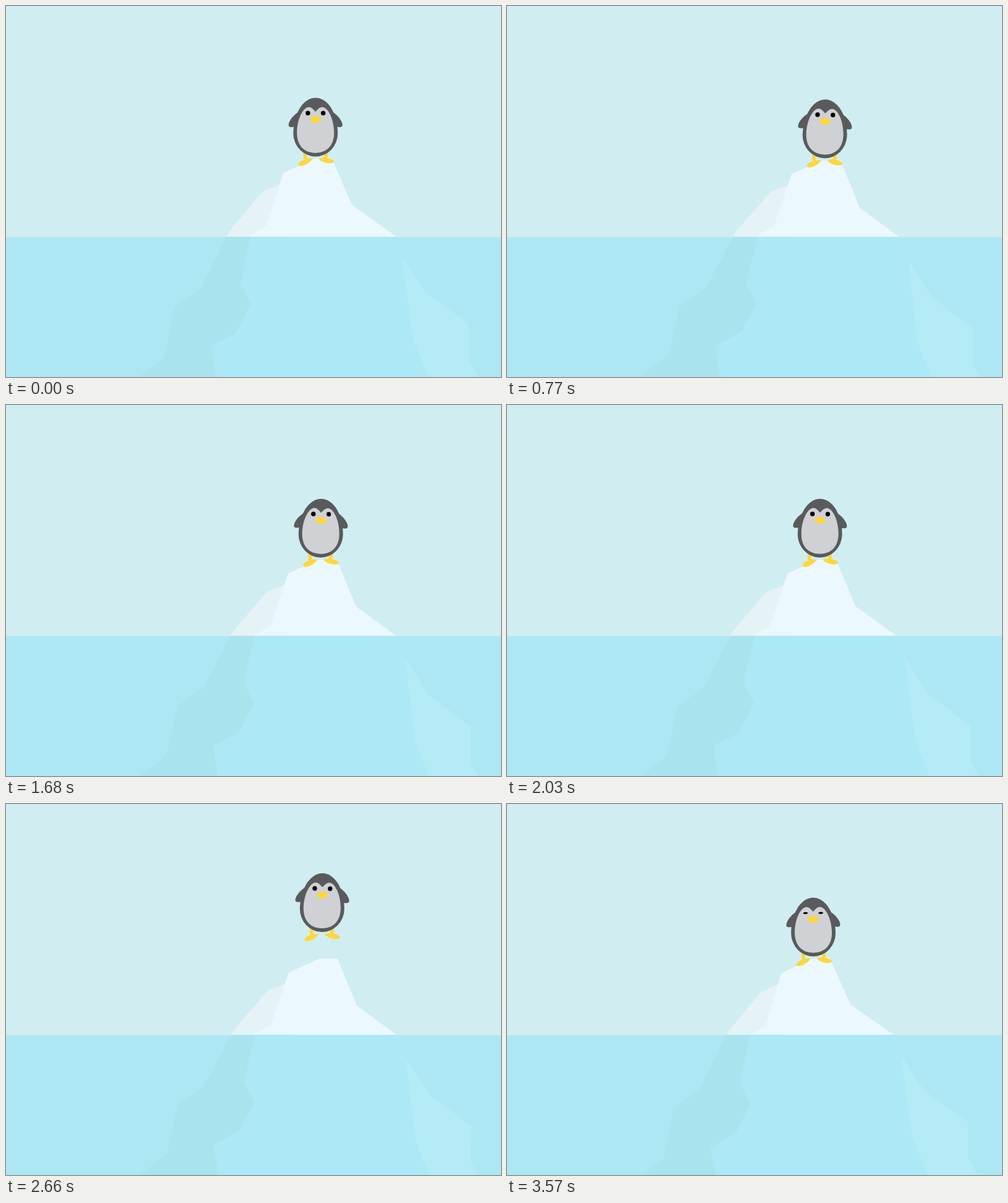
An HTML page with a canvas for the animation above (3640 ms loop, 800 by 600 pixels).

```html
<!DOCTYPE html>
<html lang="en">
<head>
<meta charset="utf-8">
<title>Penguin on an iceberg</title>
<style>
html, body { margin: 0; width: 100%; height: 100%; overflow: hidden; }
canvas { display: block; }
</style>
</head>
<body>
<canvas id="stage" width="800" height="600"></canvas>
<script>
const ctx = document.getElementById('stage').getContext('2d');
const LOOP = 3640, STEP = 70, WATER = 373.5;
const PIVOT = { x: 492, y: 800 }, RADIUS = 605;
const JUMP = { start: 2400, end: 2780, height: 46 };
const BLINK = { middle: 3605, half: 80 };

// Turning points of the swing: [time, px at the penguin's height]
const TURNS = [[-210, -6], [420, 19], [1190, 7], [1600, 9], [2330, 4], [3000, 17], [3570, -5]];

// The front face covers the inner sides of both facets.
const ICE = {
  left: new Path2D('M165 640L256 567 272 487 315 455 360 365 414.5 300 470 277 400 640Z'),
  right: new Path2D('M639.5 404L678 463 747.5 514 747.5 571 784 640 640 640Z'),
  front: new Path2D('M448 270L497 247 526 246 559 322 632.5 374 639.5 404 657 537 699 640' +
    ' 347 640 331 551 372 528 396 481 379 448 396 370 421 355Z')
};
const DARK = '#595a5b', BELLY = '#d0d1d4', YELLOW = '#fed63c';

const ease = u => (1 - Math.cos(Math.PI * Math.min(Math.max(u, 0), 1))) / 2;

function sway(t) {
  const next = Math.max(1, TURNS.findIndex(([time]) => t <= time));
  const [t0, v0] = TURNS[next - 1], [t1, v1] = TURNS[next];
  return v0 + (v1 - v0) * ease((t - t0) / (t1 - t0));
}

function jump(t) {
  const u = (t - JUMP.start) / (JUMP.end - JUMP.start);
  return Math.max(0, 4 * JUMP.height * u * (1 - u));
}

function fill(path, color) {
  ctx.fillStyle = color;
  ctx.fill(path);
}

function mirrored(draw) {
  for (const side of [-1, 1]) {
    ctx.save();
    ctx.scale(side, 1);
    draw(side);
    ctx.restore();
  }
}

function ellipse(x, y, rx, ry, color) {
  const path = new Path2D();
  path.ellipse(x, y, rx, ry, 0, 0, Math.PI * 2);
  fill(path, color);
}

function egg(y, rx, top, bottom, color) {
  const path = new Path2D();
  path.ellipse(0, y, rx, top, 0, Math.PI, 0);
  path.ellipse(0, y, rx, bottom, 0, 0, Math.PI);
  fill(path, color);
}

function layer(y, height, water, front, left, right) {
  ctx.save();
  ctx.beginPath();
  ctx.rect(0, y, 800, height);
  ctx.clip();
  ctx.fillStyle = water;
  ctx.fillRect(0, y, 800, height);
  pose();
  fill(ICE.left, left);
  fill(ICE.right, right);
  fill(ICE.front, front);
  ctx.restore();
}

function foot(side) {
  ctx.translate(5, 247);
  ctx.rotate(side < 0 ? 0.44 : 0.21);
  fill(new Path2D('M0 0C6-5 22-6 25-1C25 5 8 6 0 0Z'), YELLOW);
}

function penguin(t) {
  ctx.save();
  pose();
  ctx.translate(500, -jump(t));
  mirrored(() => fill(new Path2D('M15 238H20L19 248H13Z'), YELLOW));
  mirrored(foot);
  mirrored(() => fill(new Path2D('M26 171C34 174 44 186 43.5 193C43 197 37 196 33 195Z'), DARK));
  egg(205.5, 36, 57, 38, DARK);
  const open = Math.min(1, Math.abs(t - BLINK.middle) / BLINK.half);
  mirrored(() => {
    fill(new Path2D('M-1 171H0C3 168 6 163.5 11 163.5C20 163.5 30 183 30 205' +
      'C30 226 18 237.5 0 237.5H-1Z'), BELLY);
  });
  mirrored(() => ellipse(12.4, 173.2, 3.7, 3.7 * open, '#000'));
  mirrored(() => fill(new Path2D('M-1 178H0Q5 178 10 183.5Q5 189 0 189H-1Z'), YELLOW));
  ctx.restore();
}

let now = 0;

function pose() {
  ctx.translate(PIVOT.x, PIVOT.y + 3.1 * ease(now / 1100));
  ctx.rotate(sway(now) / RADIUS);
  ctx.translate(-PIVOT.x, -PIVOT.y);
}

function draw() {
  ctx.fillStyle = '#d0edf2';
  ctx.fillRect(0, 0, 800, 600);
  layer(0, WATER, '#d0edf2', '#ebf9fe', '#e5f2f6', '#ebf9fe');
  layer(WATER, 600 - WATER, '#ade7f3', '#ace8f5', '#a8e3ee', '#b4ebf6');
  penguin(now);
}

const start = performance.now();
function frame() {
  const t = (performance.now() - start) % LOOP;
  now = Math.floor(t / STEP) * STEP;
  draw();
  requestAnimationFrame(frame);
}
frame();
</script>
</body>
</html>
```
